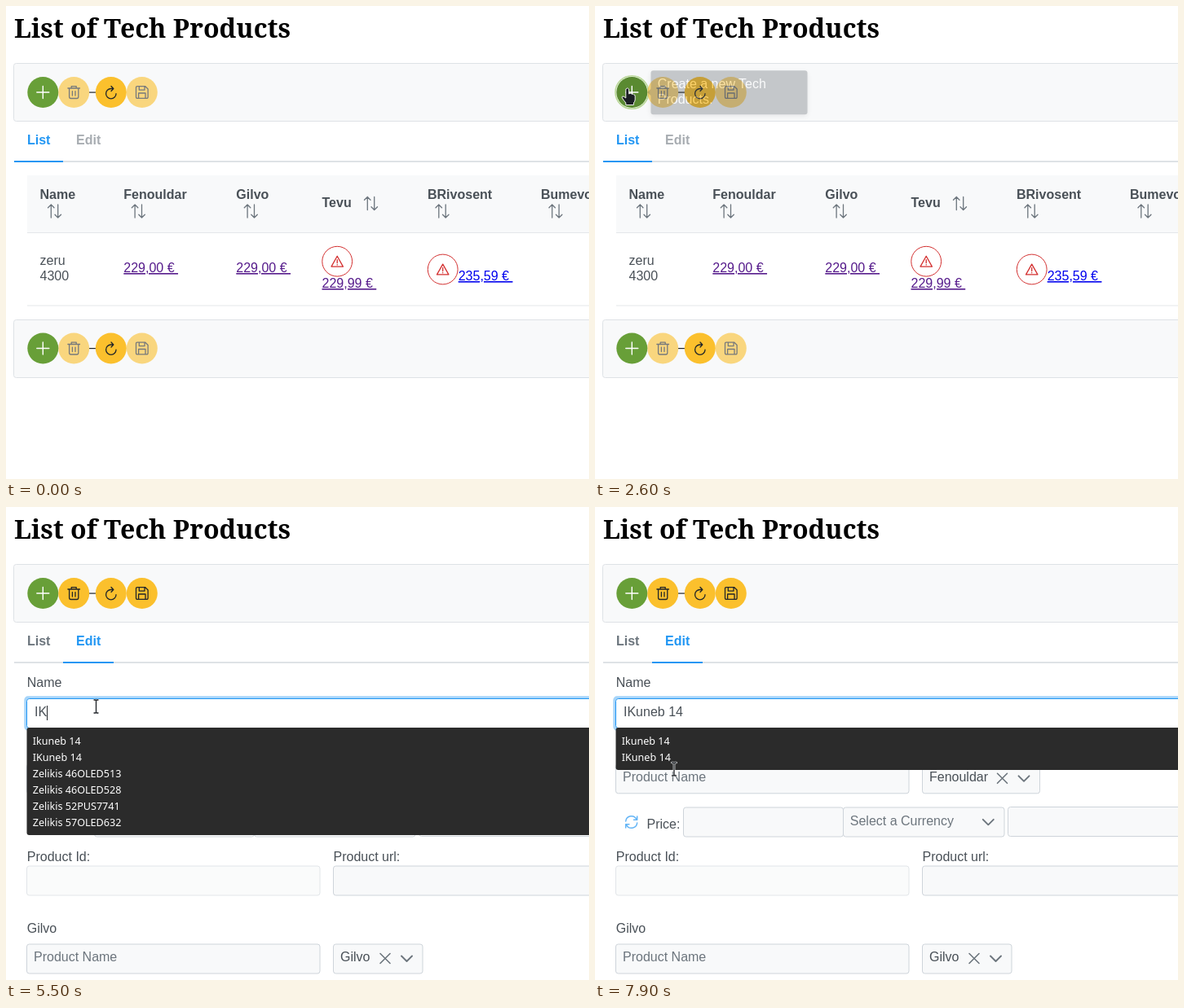
These frames come from a looping animation (715 px wide and 581 px high, 8000 ms). An HTML page:

```html
<!DOCTYPE html>
<html lang="en">
<head>
<meta charset="utf-8">
<title>List of Tech Products</title>
<style>
html, body { margin: 0; width: 100%; height: 100%; overflow: hidden; background: #fff; }
svg { display: block; width: 715px; height: 581px; font: 16px "Liberation Sans", Arial, sans-serif; fill: #495057; }
h1 { position: absolute; }
.title { font: bold 32px "Noto Serif", serif; fill: #000; }
.b { font-weight: bold; }
.hint { fill: #6c757d; }
.link { fill: #551a8b; text-decoration: underline; }
.new { fill: #00e; }
.option { font: 12.6px "Noto Sans", sans-serif; fill: #fff; }
.tip text { fill: #fff; }
.tip { filter: drop-shadow(0 2px 3px rgba(0,0,0,.25)); }
.line { fill: none; stroke-width: 1.3; stroke-linecap: round; stroke-linejoin: round; }
</style>
</head>
<body>
<svg id="stage" viewBox="0 0 715 581"></svg>
<script>
const icons = {
  plus: 'M-7.5 0H7.5M0-7.5V7.5',
  trash: 'M-7.3-5H7.3M-5.6-5V5.6Q-5.6 7.5-3.7 7.5H3.7Q5.6 7.5 5.6 5.6V-5M-3-5V-7.4H3V-5M-1.8-1.4V4M1.8-1.4V4',
  refresh: 'M6.2 1.7A6.2 6.2 0 1 1 0-4.5H2.7M.2-7.5L3-4.5L.2-1.5',
  save: 'M-5.8-7.3H4L7.3-4V5.8Q7.3 7.3 5.8 7.3H-5.8Q-7.3 7.3-7.3 5.8V-5.8Q-7.3-7.3-5.8-7.3ZM-3.5-7V-2.8H3.2V-7M-4.2 7V1H4.2V7',
  sort: 'M-4.2 8V-8M-8-4.3L-4.2-8L-.5-4.3M4.2-8V8M.5 4.3L4.2 8L8 4.3',
  warn: 'M0-6.4L7.2 6.4H-7.2ZM0-2V2M0 3.9V4.3',
  sync: 'M-7-1A7 7 0 0 1 6.3-3.2M7-7V-2.8H2.8M7 1A7 7 0 0 1-6.3 3.2M-7 7V2.8H-2.8',
  cross: 'M-6-6L6 6M6-6L-6 6',
  chevron: 'M-6.5-3L0 3.5L6.5-3'
};
const text = (x, y, s, cls = '') => `<text x="${x}" y="${y}" class="${cls}">${s}</text>`;
const icon = (name, x, y, color, w = 1.3) =>
  `<path class="line" d="${icons[name]}" transform="translate(${x} ${y})" style="stroke:${color};stroke-width:${w}"/>`;
const box = (x, y, w, h, fill = '#f8f9fa', line = '#ced4da', more = '') =>
  `<rect x="${x}" y="${y}" width="${w}" height="${h}" rx="3" fill="${fill}" stroke="${line}" ${more}/>`;
const bar = (x, y, w, h, fill) => `<rect x="${x}" y="${y}" width="${w}" height="${h}" fill="${fill}"/>`;
const group = (id, s, more = '') => `<g id="${id}" ${more}>${s}</g>`;
const circle = (x, y, fill, more = '') => `<circle cx="${x}" cy="${y}" r="19" fill="${fill}" ${more}/>`;

function button(name, x, y, off) {
  const dim = off ? 'opacity=".6"' : '';
  return `<g ${dim}>${circle(x, y, '#fbc02d')}${icon(name, x, y, '#212529')}</g>`;
}
const panel = y => box(9.5, y + .5, 720, 71, '#f8f9fa', '#dee2e6');
const buttons = (y, off) => bar(102, y - .5, 9, 1.2, '#212529') +
  button('trash', 83.2, y, off) + button('refresh', 128.8, y) + button('save', 166.8, y, off);
const add = (y, id = '') => circle(45.3, y, '#689f38', id) + icon('plus', 45.3, y, '#fff', 1.4);
const tabs = (first, second, x, w) => text(26, 169.5, 'List', 'b" fill="' + first) +
  text(86, 169.5, 'Edit', 'b" fill="' + second) + bar(10, 190, 705, 2, '#dee2e6') + bar(x, 190, w, 2, '#2196f3');
const warning = (x, y) => circle(x, y, 'none', 'stroke="#d32f2f" style="r:18.4px"') + icon('warn', x, y, '#d32f2f');
const header = (x, s, ix = x + 18, y = 237, iy = 252) => text(x, y, s, 'b') + icon('sort', ix, iy, '#6c757d');
const price = (x, y, s, cls = '') => text(x, y, s + ' €\u00a0', 'link ' + cls);

const listView = tabs('#2196f3', '#a7acb1', 10, 60) +
  bar(26, 208, 689, 70, '#f8f9fa') + bar(26, 278, 689, 1, '#e4e7ea') + bar(26, 367.5, 689, 1, '#e4e7ea') +
  header(41.5, 'Name') + header(144.3, 'Fenouldar') + header(282.3, 'Gilvo') +
  header(387.5, 'Tevu', 447.5, 247, 242.5) + header(517, 'BRivosent') + header(656, 'Bumevo') +
  text(41.5, 318, 'zeru') + text(41.5, 337, '4300') +
  price(144.3, 327, '229,00') + price(282.3, 327, '229,00') +
  warning(406.2, 313.7) + price(387.5, 346, '229,99') +
  warning(535.7, 323.5) + price(554.7, 337, '235,59', 'new') +
  panel(385) + buttons(420.5, true) + add(420.5);

const picker = (y, s, w) => box(401.5, y, w, 36) + text(410, y + 21, s) +
  icon('cross', 401.5 + w - 46, y + 17.5, '#6c757d', 1.6) + icon('chevron', 401.5 + w - 19.5, y + 17.5, '#6c757d', 1.9);
const product = y => box(25.5, y, 359.5, 36) + text(34, y + 21, 'Product Name', 'hint');

const editView = tabs('#6c757d', '#2196f3', 70, 62) + text(25.8, 221, 'Name') +
  text(25.8, 301, 'Fenouldar') + product(315.8) + picker(315.8, 'Fenouldar', 144) +
  icon('sync', 44.7, 387, '#64b5f6', 1.5) + text(63.5, 394.5, 'Price:') +
  box(108.5, 369, 196, 36) + box(304.5, 369, 197.5, 36) + text(312.8, 391, 'Select a Currency', 'hint') +
  icon('chevron', 482.3, 386.8, '#6c757d', 1.9) + box(506.5, 368.5, 230, 36) +
  text(25.8, 435, 'Product Id:') + text(401.5, 435, 'Product url:') +
  box(25.5, 441, 359.5, 36, '#fafbfb', '#e2e5e9') + box(401.5, 441, 330, 36) +
  text(25.8, 523, 'Gilvo') + product(537) + picker(537, 'Gilvo', 109.5) +
  box(23.9, 233.9, 710, 39.2, 'none', '#a6d5fa', 'id="glow" stroke-width="3.2"') +
  box(25.5, 235.5, 710, 36, '#f8f9fa', '#ced4da', 'id="field"') +
  text(35, 257, '', '" id="typed') + `<rect id="caret" y="244" width="1" height="18" fill="#212529"/>`;

const options = ['Ikuneb 14', 'IKuneb 14', 'Zelikis 46OLED513', 'Zelikis 46OLED528', 'Zelikis 52PUS7741', 'Zelikis 57OLED632'];
const menu = `<rect id="menuBox" x="25.5" y="271" width="700" rx="3" fill="#2b2b2b"/>` +
  options.map((s, i) => text(32.7, 291.5 + 20 * i, s, 'option')).join('');

const tip = (id, x, y, mid, lines) => group(id,
  `<path d="M${x - 4.5} ${mid}l5-4.5v9z"/><rect x="${x}" y="${y}" width="192" height="${lines.length * 19 + 16}" rx="3"/>` +
  lines.map((s, i) => text(x + 8.3, y + 22 + 19 * i, s)).join(''), 'class="tip"');

const cursors =
  group('arrow', '<path d="M0 0V16L3.7 12.7L6.3 18.6L9 17.4L6.5 11.7H11.5Z" fill="#1b1f24" stroke="#fff" stroke-width=".9"/>') +
  group('hand', '<path d="M-2.2 1Q0-1.5 1.6 1V7L3 6.3Q4.6 6 5.2 7.4Q6.8 6.6 7.8 8Q9.4 8 9.2 10V14Q9 16.5 7.4 18V20.5H-2.2V18Q-4 16-6.8 11.8Q-7.3 9.6-5 10L-2.2 12Z" fill="#1b1f24" stroke="#fff" stroke-width=".9"/>') +
  group('beam', ['#fff;stroke-width:2.6', '#1b1f24'].map(c =>
    `<path class="line" d="M-2.5-8H-1Q0-8 0-7Q0-8 1-8H2.5M0-7V7M-2.5 8H-1Q0 8 0 7Q0 8 1 8H2.5" style="stroke:${c}"/>`).join(''));

const $ = id => document.getElementById(id);
$('stage').innerHTML = text(10, 39, 'List of Tech Products', 'title') + panel(70) +
  `<circle id="ring" cx="45.3" cy="106" r="20.3" fill="#fff" stroke="#b9d898" stroke-width="1.6"/>` +
  add(106, 'id="add"') + group('off', buttons(106, true)) + group('on', buttons(106)) +
  group('list', listView) + group('edit', editView) + group('menu', menu) +
  tip('tipAdd', 68.5, 79.3, 106, ['Create a new Tech', 'Products.']) +
  tip('tipDel', 106.5, 69.2, 106, ['Remove permanently', 'the selected Tech', 'Products.']) + cursors;

const path = [[600, 55, -17], [800, 55, -17], [1200, 86, 97.5], [1300, 86, 98], [1700, 40, 101], [3100, 40, 101],
  [3300, 135, 165], [3400, 128, 214], [3500, 128, 214], [3900, 110.5, 245], [7600, 110.5, 245], [7900, 97, 322], [8000, 97, 322]];
const fadeDel = [[1000, 0], [1200, .87], [1300, .95], [1500, 0]];
const fadeAdd = [[1400, 0], [1700, 1], [2500, 1], [2600, .29], [2700, 0]];
const keys = [[5200, 'I'], [5500, 'IK'], [5700, 'IKu'], [5800, 'IKun'], [6000, 'IKune'], [6100, 'IKuneb'],
  [6200, 'IKuneb\u00a0'], [6900, 'IKuneb\u00a01'], [7200, 'IKuneb\u00a014']];

// Linear value between [time, ...values] stops
function at(stops, t) {
  const n = stops.findIndex(s => s[0] > t);
  if (n === 0) return stops[0].slice(1);
  if (n < 0) return stops[stops.length - 1].slice(1);
  const a = stops[n - 1], b = stops[n], k = (t - a[0]) / (b[0] - a[0]);
  return a.slice(1).map((v, i) => v + (b[i + 1] - v) * k);
}
const show = (id, yes) => $(id).style.display = yes ? '' : 'none';

function draw(t) {
  const editing = t >= 2700, focus = t >= 4200;
  show('list', !editing); show('off', !editing);
  show('edit', editing); show('on', editing);
  show('ring', t >= 2600 && t < 4200);
  $('add').setAttribute('fill', t >= 1500 && t < 3200 ? '#5a8a31' : '#689f38');
  $('tipDel').style.opacity = at(fadeDel, t)[0];
  $('tipAdd').style.opacity = at(fadeAdd, t)[0];

  show('glow', focus);
  $('field').setAttribute('fill', focus ? '#fff' : '#f8f9fa');
  $('field').setAttribute('stroke', t >= 3800 ? '#2196f3' : '#ced4da');
  const typed = keys.filter(k => k[0] <= t).pop();
  $('typed').textContent = typed ? typed[1] : '';
  show('caret', typed && t < 6400);
  if (typed) $('caret').setAttribute('x', Math.round(35 + $('typed').getComputedTextLength()));

  const rows = t < 5700 ? 6 : 2;
  show('menu', t >= 5300 && (t < 6400 || t >= 6500));
  $('menuBox').setAttribute('height', rows * 20 + 12);
  document.querySelectorAll('.option').forEach((o, i) => o.style.display = i < rows ? '' : 'none');

  const [x, y] = at(path, t);
  const shape = t < 600 ? '' : t < 1500 ? 'arrow' : t < 3200 ? 'hand' : t < 3400 ? 'arrow' : 'beam';
  for (const id of ['arrow', 'hand', 'beam']) {
    show(id, id === shape);
    $(id).setAttribute('transform', `translate(${x} ${y})`);
  }
}

const start = performance.now();
function tick() {
  draw(Math.floor((performance.now() - start) % 8000 / 100) * 100);
  requestAnimationFrame(tick);
}
tick();
</script>
</body>
</html>
```
